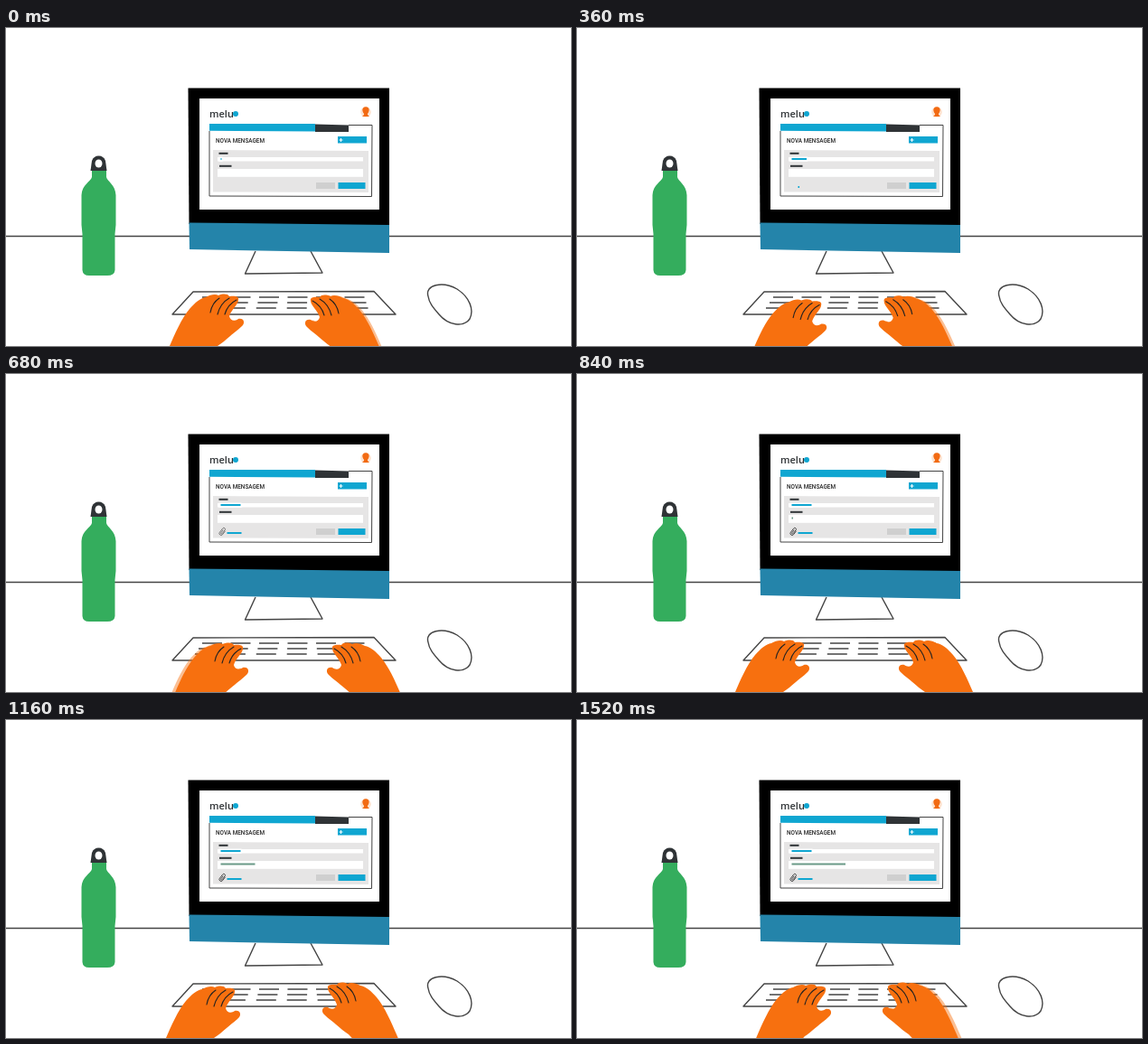
Animation of 625 by 352 pixels, one loop 1.56 s. Source, as an HTML page:

```html
<!DOCTYPE html>
<html lang="pt">
<head>
<meta charset="utf-8">
<title>Nova mensagem</title>
<style>
  html, body { margin: 0; width: 100%; height: 100%; overflow: hidden; background: #fff; }
  svg { display: block; width: 100vw; height: 100vh; }
  .line { fill: none; stroke: #444; stroke-width: 1.4; stroke-linejoin: round; }
  .blue { fill: #0fa6d1; }
  .dark { fill: #2f3336; }
  .white { fill: #fff; }
</style>
</head>
<body>
<svg viewBox="0 0 625 352">
  <defs>
    <g id="hand">
      <path fill="#f7700f" d="M-6 366L0 352C6 338 13 322 22 311C28 304 34 299 40 298C45 295 51 294 54 296C59 294 64 294 66 297C72 296 77 297 76 301C76 306 68 312 66 319C67 324 72 325 76 322C82 321 84 326 80 330C75 335 70 338 67 341C62 345 58 349 53 352L40 366Z"/>
      <path fill="none" stroke="#222" stroke-width="1.1" stroke-linecap="round" d="M45 315C46 309 49 303 55 299M53 317C55 309 59 303 66 299M61 317C63 310 68 304 74 301"/>
    </g>
  </defs>
  <rect class="white" width="625" height="352"/>
  <path class="line" d="M0 230.5H625"/>

  <g id="bottle">
    <path fill="#34ad5d" d="M95 158H111V165C112 170 121 173 121.500 185V218L120.500 228V268Q120 274 112 274H92Q85 274 84.500 268V228L83.500 218V185C84 173 94 170 95 165Z"/>
    <path class="dark" d="M93.500 158L95 147Q97 141.500 102.500 141.500T110 147L111.500 158Z"/>
    <ellipse class="white" cx="102.500" cy="150" rx="4" ry="4.500"/>
  </g>

  <g id="monitor">
    <path class="line white" style="fill:#fff" d="M276 247L264.500 272L350 271L337 247"/>
    <path d="M201.500 66.500H424V219L202.500 217Z"/>
    <path fill="#2484aa" d="M202.500 215.500L424 218V249L203 245Z"/>
    <rect class="white" x="214" y="78" width="199" height="123"/>
    <text x="225" y="98.500" font-family="'Open Sans', sans-serif" font-size="11" font-weight="600" fill="#2f3336" textLength="">melu</text>
    <circle class="blue" cx="254" cy="95" r="3"/>
    <circle cx="398" cy="93" r="5.800" fill="#fde3d0"/>
    <path fill="#f26a12" d="M398 87.300C403 87.300 402 93 400 94.800V96L402 98H394L396 96V94.800C394 93 393 87.300 398 87.300Z"/>
    <path class="line" style="stroke-width:1" d="M379 107.500H405L404.500 186.500L225 186V114"/>
    <path class="blue" d="M225 106H342V114.500L225 113.800Z"/>
    <path class="dark" d="M342 106.500L379 107.500V115H342Z"/>
    <text x="232" y="127" font-family="Roboto, sans-serif" font-size="6.400" font-weight="500" fill="#222">NOVA MENSAGEM</text>
    <rect class="blue" x="367" y="120" width="32" height="7.500"/>
    <path stroke="#fff" d="M368.500 124H372.500M370.500 122V126"/>
    <path fill="#e6e5e5" d="M229 135L401 136V182L229 181.500Z"/>
    <rect class="dark" x="235.500" y="137.800" width="10" height="2"/>
    <rect class="white" x="234" y="143" width="161" height="4.500"/>
    <rect class="dark" x="236" y="151.800" width="13.500" height="2"/>
    <rect class="white" x="234" y="156" width="161" height="8.800"/>
    <rect fill="#cfcfcf" x="343" y="171" width="21" height="7"/>
    <rect class="blue" x="367.500" y="171" width="30" height="7"/>
    <rect id="patch" class="white" x="235.500" y="142.500" height="5.500"/>
    <rect id="subject" class="blue" x="237.500" y="144" height="2"/>
    <rect id="file" class="blue" x="244.500" y="175" height="2"/>
    <rect id="body" fill="#6a9a87" x="237.500" y="158.500" height="2"/>
    <path id="clip" transform="translate(239.500 174.500) rotate(38)" fill="none" stroke="#444" stroke-width=".9" d="M2 -2.500V2.500A2 2 0 0 1 -2 2.500V-3A1.500 1.500 0 0 1 1 -3V2A.7 .7 0 0 1 -.6 2V-2"/>
  </g>

  <path class="line" d="M207 292L407 291.500L431 317H184Z"/>
  <path id="keys" class="line"/>
  <path class="line" d="M467 297C463 284 483 280 499 289C513 298 518 312 513 322C506 332 489 329 479 317C472 309 468 304 467 297Z"/>

  <g id="left"><use href="#hand" opacity=".45"/><use href="#hand"/></g>
  <g id="right"><use href="#hand" opacity=".45"/><use href="#hand"/></g>
</svg>
<script>
const LOOP = 1560, STEP = 40;
const $ = id => document.getElementById(id);

// time, left x, y, blur, right x, y, blur
const poses = [
  [0, 181, 0, 0, 413, 1, 3],
  [200, 193, 5, 0, 406, 0, 0],
  [480, 195, 6, 0, 423, 3, 6],
  [560, 193, 5, 0, 437, 3, 0],
  [680, 186, 3, 4, 437, 3, 0],
  [840, 175, 0, 0, 438, 0, 0],
  [1160, 177, 0, 0, 432, -4, 0],
  [1520, 199, -2, 0, 420, -4, 4]
];
const subject = [[0, 1], [200, 4.5], [420, 21], [560, 22]];
const file = [[160, 0], [480, 2.5], [640, 16]];
const body = [[800, 0], [840, 1.5], [1160, 38], [1520, 59.5]];
const clip = [[440, 0], [480, .15], [680, .7], [760, 1]];

// Linear track of [time, ...values], held at both ends
function at(track, t) {
  const i = track.findIndex(k => k[0] > t);
  if (i === 0) return track[0].slice(1);
  if (i < 0) return track[track.length - 1].slice(1);
  const a = track[i - 1], b = track[i], p = (t - a[0]) / (b[0] - a[0]);
  return a.slice(1).map((v, n) => v + (b[n + 1] - v) * p);
}

function place(id, x, y, blur, flip) {
  const g = $(id), ghost = g.firstElementChild;
  g.setAttribute('transform', `translate(${x} ${y}) scale(${flip} 1)`);
  ghost.setAttribute('transform', `translate(${-blur} ${blur * .2})`);
  ghost.style.display = blur > .5 ? '' : 'none';
}

function draw(now) {
  const t = Math.floor(now % LOOP / STEP) * STEP;
  const [lx, ly, lb, rx, ry, rb] = at(poses, t);
  place('left', lx, ly, lb, 1);
  place('right', rx, ry, rb, -1);
  const w = at(subject, t)[0];
  $('subject').setAttribute('width', w);
  $('patch').setAttribute('width', w + 3);
  $('file').setAttribute('width', at(file, t)[0]);
  $('body').setAttribute('width', at(body, t)[0]);
  $('clip').setAttribute('opacity', at(clip, t)[0]);
}

let keys = '';
for (let row = 0; row < 3; row++)
  for (let col = 0; col < 6; col++)
    keys += `M${217 - row * 4 + col * (31.5 + row * 1.2)} ${298 + row * 6}h22`;
$('keys').setAttribute('d', keys);

const start = performance.now();
function tick() {
  draw(performance.now() - start);
  requestAnimationFrame(tick);
}
tick();
</script>
</body>
</html>
```
